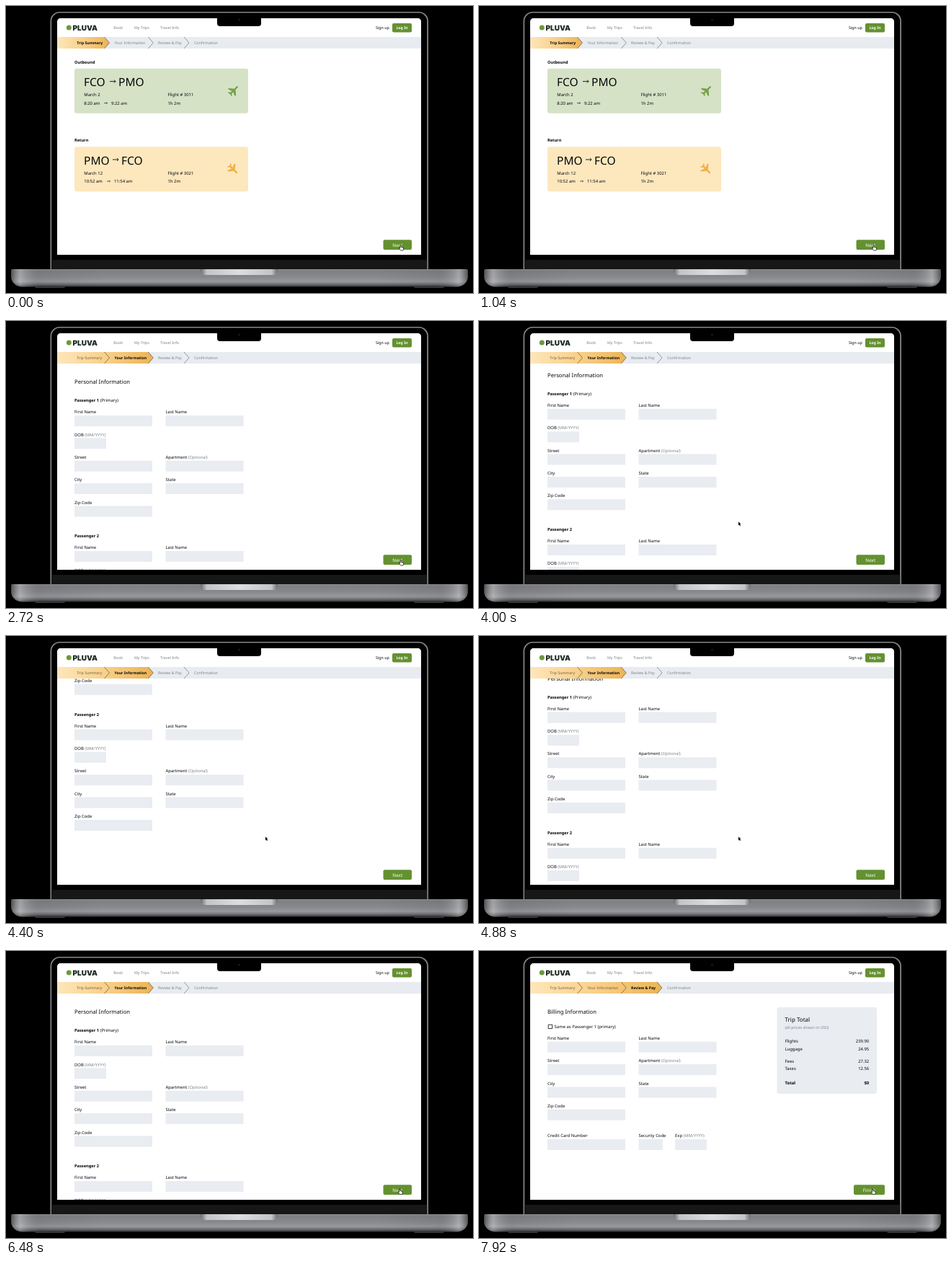
An HTML page with a canvas for the animation above (8000 ms loop, 648 px wide and 398 px high).

```html
<!DOCTYPE html>
<html lang="en">
<head>
<meta charset="utf-8">
<title>Flight booking</title>
<style>
html, body { margin: 0; width: 100%; height: 100%; overflow: hidden; background: #000; }
canvas { display: block; width: 648px; height: 398px; }
</style>
</head>
<body>
<canvas id="stage"></canvas>
<script>
const W = 648, H = 398, LOOP = 8000;
const canvas = document.getElementById('stage');
const ctx = canvas.getContext('2d');
const dpr = window.devicePixelRatio || 1;
canvas.width = W * dpr;
canvas.height = H * dpr;

const INK = '#04070a', MUTED = '#7d848b', GREEN = '#649130', FIELD = '#e9ecf1';
const SANS = '"Noto Sans", "Open Sans", sans-serif';
const COL1 = 95, COL2 = 221.5, ROW = 31.35;

// ---- helpers ----

function box(x, y, w, h, color, r = 0) {
  ctx.fillStyle = color;
  ctx.beginPath();
  ctx.roundRect(x, y, w, h, r);
  ctx.fill();
}

// y is the middle of the capital letters
function text(str, x, y, { size = 5.9, color = INK, weight = 400, align = 'left', family = SANS } = {}) {
  ctx.font = `${weight} ${size}px ${family}`;
  ctx.fillStyle = color;
  ctx.textAlign = align;
  ctx.fillText(str, x, y + size * 0.357);
  return x + ctx.measureText(str).width;
}

function trace(points) {
  ctx.beginPath();
  points.forEach(([x, y]) => ctx.lineTo(x, y));
}

function line(points, color, width) {
  ctx.strokeStyle = color;
  ctx.lineWidth = width;
  trace(points);
  ctx.stroke();
}

function gradient(x0, y0, x1, y1, stops) {
  const g = ctx.createLinearGradient(x0, y0, x1, y1);
  stops.forEach(([at, color]) => g.addColorStop(at, color));
  return g;
}

const ease = x => x < 0.5 ? 4 * x ** 3 : 1 - 4 * (1 - x) ** 3;
const span = (t, from, to) => ease(Math.min(1, Math.max(0, (t - from) / (to - from))));

function arrow(x, y, w, head, width) {
  line([[x, y], [x + w, y]], INK, width);
  line([[x + w - head, y - head], [x + w, y], [x + w - head, y + head]], INK, width);
}

// ---- laptop ----

function drawLid() {
  box(61.5, 8, 524.5, 358, '#858688', [13, 13, 0, 0]);
  box(63.2, 9.6, 521, 356, '#000', [11.5, 11.5, 0, 0]);
  box(63.2, 352, 521, 13, '#171718');
}

function drawBase() {
  box(40, 387, 42, 4, '#39393b', 2);
  box(566, 387, 42, 4, '#39393b', 2);
  const shape = [2, 2, 15, 15];
  box(7, 365, 634, 24.5, gradient(0, 365, 0, 389.5, [
    [0, '#8f9094'], [0.1, '#7f8084'], [0.45, '#88898d'], [0.7, '#98999d'], [0.86, '#6c6d70'], [1, '#2c2c2e']
  ]), shape);
  box(7, 365, 634, 24.5, gradient(7, 0, 641, 0, [
    [0, 'rgba(0,0,0,.4)'], [0.02, 'rgba(255,255,255,.25)'], [0.07, 'rgba(0,0,0,.06)'],
    [0.2, 'rgba(0,0,0,0)'], [0.8, 'rgba(0,0,0,0)'], [0.93, 'rgba(0,0,0,.06)'],
    [0.98, 'rgba(255,255,255,.25)'], [1, 'rgba(0,0,0,.4)']
  ]), shape);
  box(270, 365, 107, 8, gradient(270, 0, 377, 0, [
    [0, '#6b6c70'], [0.08, '#c3c4c7'], [0.5, '#dcdde0'], [0.92, '#c3c4c7'], [1, '#6b6c70']
  ]), [0, 0, 6, 6]);
}

function drawNotch() {
  box(293, 16, 61, 12, '#000', [0, 0, 4, 4]);
  ctx.fillStyle = '#15181f';
  ctx.beginPath();
  ctx.arc(323.5, 19, 1.6, 0, Math.PI * 2);
  ctx.fill();
}

// ---- page frame ----

function drawHeader() {
  box(71, 17, 505, 26, '#fff');
  ctx.fillStyle = '#6b9a3c';
  ctx.beginPath();
  ctx.arc(87.3, 30, 3.5, 0, Math.PI * 2);
  ctx.fill();
  text('PLUVA', 92.5, 30, { size: 10, weight: 900, color: '#1c2a22', family: 'Inter, sans-serif' });
  const nav = { size: 5.3, color: '#7b8086' };
  text('Book', 149.3, 30, nav);
  text('My Trips', 178, 30, nav);
  text('Travel Info', 214, 30, nav);
  text('Sign up', 513, 30, { size: 5.3 });
  box(536, 24, 27, 12.5, GREEN, 2);
  text('Log In', 549.5, 30.2, { size: 5.2, weight: 700, color: '#fff', align: 'center' });
}

const STEPS = [
  { label: 'Trip Summary', x: 98.3, tip: 143.5 },
  { label: 'Your Information', x: 150.6, tip: 204.3 },
  { label: 'Review & Pay', x: 211, tip: 254 },
  { label: 'Confirmation', x: 261, tip: 0 }
];

function drawSteps(current) {
  const top = 43, mid = 51, bottom = 59;
  box(71, top, 505, bottom - top, '#e8ecf1');
  const end = STEPS[current].tip;
  ctx.fillStyle = gradient(71, 0, end, 0, [[0, '#fee6ba'], [0.5, '#f8d08a'], [1, '#ecb354']]);
  trace([[71, top], [end - 7, top], [end, mid], [end - 7, bottom], [71, bottom]]);
  ctx.fill();
  STEPS.forEach(({ label, x, tip }, i) => {
    if (tip) line([[tip - 7, top], [tip, mid], [tip - 7, bottom]], i <= current ? '#59513f' : '#68717a', 0.7);
    const active = i === current;
    text(label, x, mid + 0.3, {
      size: active ? 5.15 : 5.3,
      weight: active ? 700 : 400,
      color: active ? INK : i < current ? '#75623f' : MUTED
    });
  });
}

function drawButton(label, x) {
  box(x, 324.3, 563 - x, 13.8, GREEN, 2);
  text(label, (x + 563) / 2, 331.3, { size: 6.3, color: '#fff', align: 'center' });
}

// ---- pages ----

function drawPlane(x, y, angle, color) {
  ctx.save();
  ctx.translate(x, y);
  ctx.rotate(angle);
  box(-6.5, -1.1, 15, 2.2, color, 1.1);
  for (const s of [-1, 1]) {
    trace([[3, s], [-2, s * 7], [-3.8, s * 7], [-1.6, s]]);
    ctx.fill();
    trace([[-4.2, s], [-6.4, s * 3.4], [-7.6, s * 3.4], [-6.3, 0]]);
    ctx.fill();
  }
  ctx.restore();
}

function drawFlight(y, f) {
  text(f.title, COL1, y - 9.2, { size: 5.6, weight: 700 });
  box(95, y, 241, 62, f.fill, 3);
  const big = { size: 15.5 };
  text(f.from, 108, y + 18.8, big);
  arrow(f.arrow, y + 17.8, 8, 2, 0.9);
  text(f.to, f.toX, y + 18.8, big);
  text(f.date, 108.3, y + 36.4);
  text(f.number, 224.5, y + 36.4);
  text(f.leave, 108.3, y + 47.8);
  arrow(f.midX, y + 47.8, 4.5, 1.2, 0.6);
  text(f.arrive, f.midX + 10, y + 47.8);
  text('1h 2m', 224.5, y + 47.8);
  drawPlane(f.planeX, y + 30.7, f.angle, f.tint);
}

function drawSummary() {
  drawFlight(86.8, {
    title: 'Outbound', from: 'FCO', to: 'PMO', arrow: 144, toX: 156, date: 'March 2',
    number: 'Flight # 3011', leave: '8:20 am', arrive: '9:22 am', midX: 136,
    fill: '#d5e2c6', tint: '#72a044', planeX: 315.6, angle: -Math.PI / 4
  });
  drawFlight(195.2, {
    title: 'Return', from: 'PMO', to: 'FCO', arrow: 148, toX: 160, date: 'March 12',
    number: 'Flight # 3021', leave: '10:52 am', arrive: '11:54 am', midX: 140,
    fill: '#fde7bd', tint: '#eeb044', planeX: 314.8, angle: Math.PI / 4
  });
  drawButton('Next', 523.5);
}

function field(label, x, y, w = 108, hint = '') {
  const end = text(label, x, y);
  if (hint) text(hint, end + 1.5, y, { color: MUTED, size: 5.8 });
  box(x, y + 4.9, w, 15, FIELD);
}

function nameRow(y) {
  field('First Name', COL1, y);
  field('Last Name', COL2, y);
}

function addressRows(y) {
  field('Street', COL1, y);
  field('Apartment', COL2, y, 108, '(Optional)');
  field('City', COL1, y + ROW);
  field('State', COL2, y + ROW);
  field('Zip Code', COL1, y + 2 * ROW);
}

function drawPassenger(n, y) {
  const end = text('Passenger ' + n, COL1, y, { size: 5.7, weight: 700 });
  if (n === 1) text('(Primary)', end + 1.6, y);
  nameRow(y + 16.1);
  field('DOB', COL1, y + 16.1 + ROW, 44, '(MM/YYYY)');
  addressRows(y + 16.1 + 2 * ROW);
}

function drawInformation(t) {
  const scroll = 190 * (span(t, 3868, 4448) - span(t, 4488, 5068));
  ctx.save();
  ctx.translate(0, -scroll);
  text('Personal Information', COL1, 84.6, { size: 7.7 });
  drawPassenger(1, 110);
  drawPassenger(2, 298.1);
  ctx.restore();
  drawButton('Next', 523.5);
}

const PRICES = [
  ['Flights', '239.90', 125.3], ['Luggage', '24.95', 135.8],
  ['Fees', '27.32', 153], ['Taxes', '12.56', 163.2], ['Total', '$0', 183]
];

function drawBilling() {
  text('Billing Information', COL1, 84.4, { size: 7.7 });
  ctx.strokeStyle = INK;
  ctx.lineWidth = 0.8;
  ctx.strokeRect(96.2, 102.2, 5.4, 5.4);
  text('Same as Passenger 1 (primary)', 104.6, 105);
  nameRow(120.8);
  addressRows(120.8 + ROW);
  field('Credit Card Number', COL1, 256.2);
  field('Security Code', COL2, 256.2, 33.5);
  field('Exp', 272, 256.2, 44, '(MM/YYYY)');

  box(413.5, 78, 138.5, 120, FIELD, 3);
  text('Trip Total', 424.5, 95.3, { size: 8 });
  text('(all prices shown in USD)', 424.5, 106, { size: 5.3, color: MUTED });
  PRICES.forEach(([name, price, y]) => {
    const weight = name === 'Total' ? 700 : 400;
    text(name, 424.5, y, { weight });
    text(price, 541.2, y, { weight, align: 'right' });
  });
  drawButton('Finish', 520);
}

// ---- pointer ----

function drawArrowCursor(x, y) {
  ctx.save();
  ctx.translate(x, y);
  trace([[0, 0], [0, 5.2], [1.2, 4.2], [2, 6], [2.9, 5.6], [2.1, 3.9], [3.6, 3.8]]);
  ctx.closePath();
  ctx.strokeStyle = '#fff';
  ctx.lineWidth = 0.9;
  ctx.stroke();
  ctx.fillStyle = '#000';
  ctx.fill();
  ctx.restore();
}

function drawHandCursor(x, y) {
  ctx.save();
  ctx.translate(x, y);
  trace([[-0.8, 0], [0.5, 0], [0.7, 2.4], [3.6, 3.2], [4, 5], [3.2, 7.2], [0, 7.2], [-2.4, 4.4], [-1.9, 3.6], [-0.8, 4.2]]);
  ctx.closePath();
  ctx.fillStyle = '#fff';
  ctx.fill();
  ctx.strokeStyle = '#000';
  ctx.lineWidth = 0.7;
  ctx.stroke();
  ctx.restore();
}

const MOVES = [
  { from: 2880, to: 3480, x: 360, y: 278.2 },
  { from: 5200, to: 5620, x: 531, y: 294 },
  { from: 5720, to: 6120, x: 546.4, y: 330.2 }
];

function drawCursor(t) {
  let x = 547.7, y = 331.8;
  for (const m of MOVES) {
    const k = span(t, m.from, m.to);
    x += (m.x - x) * k;
    y += (m.y - y) * k;
  }
  const overButton = x > 523 && y > 324;
  (overButton ? drawHandCursor : drawArrowCursor)(x, y);
}

// ---- loop ----

function draw(t) {
  ctx.setTransform(dpr, 0, 0, dpr, 0, 0);
  ctx.textRendering = 'geometricPrecision';
  ctx.lineJoin = 'round';
  box(0, 0, W, H, '#000');
  drawLid();
  drawBase();

  ctx.save();
  ctx.beginPath();
  ctx.roundRect(71, 17, 505, 328, [5, 5, 0, 0]);
  ctx.clip();
  box(71, 17, 505, 328, '#fff');
  const page = t < 2480 ? 0 : t < 7000 ? 1 : 2;
  [drawSummary, drawInformation, drawBilling][page](t);
  drawHeader();
  drawSteps(page);
  drawCursor(t);
  ctx.restore();
  drawNotch();
}

function tick() {
  draw(performance.now() % LOOP);
  requestAnimationFrame(tick);
}
tick();
</script>
</body>
</html>
```
